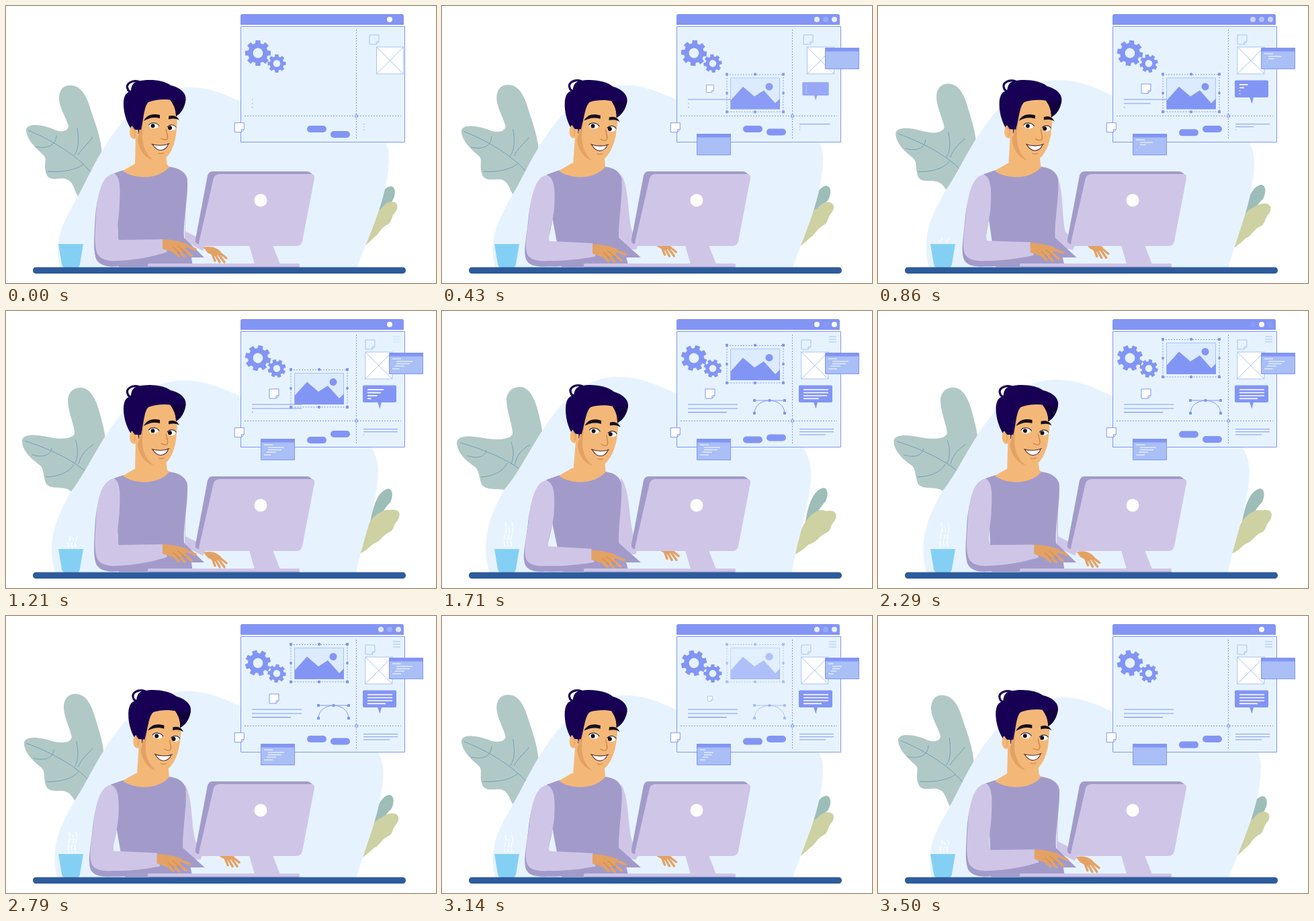
Animation, 640 px wide and 412 px high, one loop 3.57 s. Source, as an HTML page with a canvas:

```html
<!DOCTYPE html>
<html>
<head>
<meta charset="utf-8">
<title>Designer at work</title>
<style>
html, body { margin: 0; width: 100%; height: 100%; overflow: hidden; background: #fff; }
canvas { display: block; }
</style>
</head>
<body>
<canvas id="stage" width="640" height="412"></canvas>
<script>
const c = document.getElementById('stage').getContext('2d');
const LOOP = 3570, STEP = LOOP / 50;
const BLUE = '#8395f4', PALE = '#e6f3ff', CARD = '#a9bff6', LINE = '#a9c2f6';
const LILAC = '#cfc6e7', PURPLE = '#a29bca', SKIN = '#f3b878', TAN = '#e3a264', HAIR = '#170054', INK = '#150f1e';

const clamp = x => Math.max(0, Math.min(1, x));
const ramp = (t, a, b) => clamp((t - a) / (b - a));
const ease = (t, a, b) => (1 - Math.cos(Math.PI * ramp(t, a, b))) / 2;
const wave = (t, period) => (1 - Math.cos(2 * Math.PI * t / period)) / 2;
// A wave that rests for a while at both ends.
const sway = (t, period) => clamp(.5 + 1.3 * (wave(t, period) - .5));
const lerp = (a, b, k) => a + (b - a) * k;

// Blend two paths that share the same commands.
function mix(a, b, k) {
  const to = b.match(/[\d.]+/g);
  let i = 0;
  return a.replace(/[\d.]+/g, n => lerp(+n, +to[i++], k).toFixed(2));
}
function fill(color, d) {
  c.fillStyle = color;
  c.fill(new Path2D(d));
}
function line(color, d, width = 1, dash = []) {
  c.strokeStyle = color;
  c.lineWidth = width;
  c.setLineDash(dash);
  c.stroke(new Path2D(d));
  c.setLineDash([]);
}
function box(x, y, w, h, color, edge, r = 0) {
  c.beginPath();
  c.roundRect(x, y, w, h, r);
  if (color) { c.fillStyle = color; c.fill(); }
  if (edge) { c.strokeStyle = edge; c.lineWidth = 1; c.stroke(); }
}
function oval(x, y, rx, ry, color) {
  c.beginPath();
  c.ellipse(x, y, rx, ry, 0, 0, 7);
  c.fillStyle = color;
  c.fill();
}
const dot = (x, y, r, color) => oval(x, y, r, r, color);
function group(draw, { x = 0, y = 0, turn = 0, scale = 1, alpha = 1 }) {
  if (alpha <= 0 || scale <= 0) return;
  c.save();
  c.translate(x, y);
  c.rotate(turn);
  c.scale(scale, scale);
  c.globalAlpha *= alpha;
  draw();
  c.restore();
}

function plants(k) {
  fill('#b1c9c6', mix(
    'M107,283 C100,270 100,260 88,257 C80,255 65,262 60,250 C55,235 62,228 56,222 C48,214 30,200 30,184 C32,172 60,178 72,184 C82,188 92,187 93,179 C90,166 78,150 79,135 C80,122 88,117 97,118 C115,119 122,140 128,160 C135,180 142,200 143,222 L140,260Z',
    'M100,270 C95,266 90,265 82,265 C72,265 60,264 58,255 C55,245 55,236 48,231 C38,224 22,212 22,195 C24,184 45,186 62,189 C80,192 101,192 105,183 C106,172 96,150 96,130 C98,117 108,112 118,113 C132,115 140,135 144,153 C148,170 150,180 150,190 L140,260Z', k));
  line('#739fbb', mix(
    'M33,185 C70,200 110,225 130,252 M44,209 C60,213 75,208 75,192 M62,246 C85,248 105,243 115,236 M106,181 C109,200 108,215 101,222 M129,195 C122,205 112,213 107,222',
    'M27,196 C60,205 95,220 114,234 M37,215 C50,220 64,218 66,207 M58,247 C75,246 90,240 97,226 M103,195 C108,210 106,220 103,228 M131,199 C120,205 112,212 108,229', k));
  fill('#9dbdb9', mix(
    'M545,318 C552,290 560,269 573,268 C581,270 580,282 575,290 C567,296 562,306 548,322Z',
    'M540,320 C544,290 552,266 568,263 C575,264 575,275 571,283 C562,292 558,303 545,322Z', k));
  fill('#ced1a1', mix(
    'M530,360 C535,328 545,306 558,302 C564,294 568,292 572,291 C586,290 584,303 578,308 C572,316 575,322 566,326 C556,332 555,340 548,344 C543,349 538,354 530,360Z',
    'M525,362 C530,330 540,305 560,297 C568,294 570,299 575,297 C590,296 588,308 583,314 C577,320 580,327 570,331 C560,336 557,345 546,347 C540,352 536,357 525,362Z', k));
  fill(PALE, mix(
    'M82,395 C68,345 88,318 107,283 C132,240 174,121 275,121 C325,121 350,152 400,155 C480,155 570,170 570,222 C570,285 540,340 520,395 Q300,402 82,395Z',
    'M72,395 C56,345 70,305 93,265 C134,222 168,98 262,98 C315,98 345,128 400,140 C480,145 549,185 549,240 C549,290 526,345 520,395 Q300,402 72,395Z', k));
}

function gear(x, y, r, turn) {
  group(() => {
    dot(0, 0, r * .78, BLUE);
    for (let i = 0; i < 8; i++) {
      fill(BLUE, `M${-r * .25},0 L${-r * .19},${-r} H${r * .19} L${r * .25},0Z`);
      c.rotate(Math.PI / 4);
    }
    dot(0, 0, r * .39, PALE);
  }, { x, y, turn });
}

function note(edge, face) {
  fill(face, 'M-7,-7 H7 V3 L3,7 H-7Z');
  line(edge, 'M-7,-7 H7 V3 L3,7 H-7Z M3,7 V3 H7');
}

// Each row is x, y and full width; rows appear one after another.
function rows(list, color, width, grow) {
  list.forEach(([x, y, w], i) => line(color, `M${x},${y} h${Math.max(1.2, w * grow(i))}`, width));
}

function card(x, y, t) {
  group(() => {
    box(.5, .5, 50, 31, CARD, BLUE);
    box(0, 0, 51, 5.5, BLUE);
    const out = 1 - ramp(t, 2950, 3400);
    if (t > 480 && out > 0)
      rows([[5, 9, 13], [11, 13, 24], [11, 16.5, 20], [9, 20, 14], [5, 24, 13]], '#f2f7ff', 1.2,
        i => ramp(t, 480 + i * 120, 800 + i * 120) * out);
  }, { x, y, alpha: ramp(t, 60, 350) });
}

function picture() {
  line(BLUE, 'M424,0.5 H508 V56 H424Z', 1, [2, 2]);
  box(429.5, 5.5, 73, 46, '#dcebfe', LINE);
  fill(BLUE, 'M429.5,52 V39 L448,18.5 L465,33 L479,24 L496,43 L503,36 V52Z');
  dot(487, 18.5, 5.5, BLUE);
  for (const x of [424, 508]) {
    for (const y of [0, 56]) box(x - 2, y - 2, 4, 4, BLUE);
    dot(x, 28, 2, BLUE);
  }
  for (const y of [0, 56]) dot(466, y, 2.2, BLUE);
}

function curve() {
  line(BLUE, 'M465,133 H510 M465,152 C466,127 509,127 510,152');
  for (const [x, y] of [[465, 133], [510, 133], [465, 152], [510, 152]]) box(x - 2, y - 2, 4, 4, BLUE);
  dot(487.5, 133, 2.2, BLUE);
}

function bubble(t) {
  box(-25, -13, 50, 25.5, BLUE, null, 2);
  fill(BLUE, 'M-3,12 H3 L0.5,22Z');
  rows([[-18, -6.5, 37], [-18, -2, 37], [-18, 2.5, 37], [-18, 6.8, 27]], '#fff', 1.7,
    i => ramp(t, 480 + i * 190, 1600 + i * 80));
}

function panel(t, k) {
  fill(BLUE, 'M349,28 V15 Q349,12 352,12 H589 Q592,12 592,15 V28Z');
  box(349.5, 30.5, 244, 172, PALE, BLUE);
  [[558, k], [571, 1 - k], [584, k]].forEach(([x, a]) =>
    group(() => dot(0, 0, 4, '#fff'), { x, y: 20, alpha: a }));

  line(BLUE, 'M521.5,35 V198 M355,163.5 H588', 1, [2, 2]);
  dot(521.5, 163.5, 2.5, BLUE);
  dot(521.5, 163.5, 1.2, PALE);

  const turn = t * .00018;
  gear(375, 70, 19, turn);
  gear(403, 85.5, 13.5, -turn * 1.4);

  box(448, 178 + 9 * sway(t - 200, 2400), 29, 10, BLUE, null, 5);
  box(483, 186 - 8 * sway(t + 110, 2290), 29, 10, BLUE, null, 5);

  const slide = ease(t, 0, 880);
  group(() => note(LINE, PALE), { x: 548 - 6 * slide, y: 50 });
  group(() => {
    box(.5, .5, 40, 40, '#fff', LINE);
    line(LINE, 'M0,0 L41,41 M41,0 L0,41');
  }, { x: 551 - 16.7 * slide, y: 60.5 });
  group(() => note(BLUE, '#fff'), { x: 347.3, y: 180.7 });

  group(() => line(LINE, 'M576,38 h11 M576,42 h11 M576,46 h11'), { alpha: ramp(t, 950, 1600) });

  const grow = i => ramp(t, i * 600, 480 + i * 600);
  rows([[366, 139, 74], [366, 145, 74], [366, 150.7, 58]], BLUE, 1.2, grow);
  rows([[532, 175.7, 51], [532, 179.7, 51], [532, 184, 39]], BLUE, 1, grow);

  const pop = ease(t, 130, 560), out = 1 - ramp(t, 2950, 3350);
  group(() => note(BLUE, '#fff'), { x: 399, y: 123, scale: pop * out });
  group(() => bubble(t), { x: 556, y: 123.5, scale: pop, alpha: pop });
  group(curve, { alpha: ramp(t, 1250, 1600) * out });
  group(picture, { y: 101.5 - 59.5 * ease(t, 822, 2015), alpha: ramp(t, 100, 460) * out });
  card(379, 190, t);
  card(570, 62, t);
}

function head() {
  // neck, back of the hair, ear, face
  fill(SKIN, 'M193,190 L192,238 C205,252 232,250 240,238 L238,222Z');
  fill(HAIR, 'M192,190 C183,182 174,162 175,142 C176,132 180,128 186,127 L225,130 L212,190Z');
  oval(190.5, 187.5, 6.5, 10.5, SKIN);
  line(TAN, 'M188,182 C192,183 193,189 191,194', 1.3);
  fill(SKIN, 'M203,146 C210,132 245,132 253,148 C255,160 255,172 254,182 C253,200 248,215 240,224 C235,229 225,231 218,229 C205,225 198,212 196,200 L199,180Z');
  fill(TAN, 'M203,148 L210,143 C204,165 203,180 203,198 C205,214 211,223 220,229.5 C205,226 198,212 196,200 L199,180Z');
  fill(HAIR, 'M192,184 C178,168 175,140 186,127 C186,118 190,113 197,112 C212,108 235,110 245,118 C262,122 270,132 267,142 C265,152 260,160 253,164 C253,155 250,147 246,140 C236,138 222,139 212,143 C205,149 205,168 201,184Z');
  fill('#12003d', 'M244,139.5 C253,141 262,139 267.5,139 C266,152 260,160 253,164 C253,155 250,147 244,139.5Z');
  line(HAIR, 'M198,112.5 C187,109.5 178,116 181,123 C182,127 185,128 188,127', 3.2);
  // brows and eyes
  fill(INK, 'M205,171 C209,162 218,159 229,162 L229,167 C219,164.5 212,167 205,171Z');
  fill(INK, 'M242,164 C249,161.5 255,164 258,170 C253,167 248,167 242,168.5Z');
  oval(220, 178, 7, 4.3, '#fff');
  oval(246.5, 181, 6, 4.2, '#fff');
  line(INK, 'M212.5,177 C215,172.5 224,172.5 228,178 M240,180 C243,176 250,175.5 253,180', 1);
  dot(218.5, 178.3, 3, INK);
  dot(244, 181.3, 3, INK);
  // nose and mouth
  line('#cd8848', 'M238,183 C239,190 243,195 239,198.5 C236,200 233,198 231,197', 1.4);
  fill('#fff', 'M218,206 C225,208 236,208 242,205 C240,214 232,217 226,214 C222,212 220,209 218,206Z');
  line('#592a28', 'M217,205.5 C225,208 236,208 243,204.5 M218,206 C222,212 226,215 231,214.5 C237,214 240,210 241.5,205.5', 1.1);
  line('#cd8848', 'M227,219 Q231,220.5 235,218.5', 1.1);
}

function rightHand() {
  fill(TAN, 'M294,359 C305,356 315,360 320,366 L312,373 L300,367Z');
  line(TAN, 'M313,363 L328,375 M314,366 L325,381 M310,367 L318,381 M306,366 L311,379', 3.4);
}
function leftHand() {
  fill(TAN, 'M233,347 C248,347 262,351 270,354 L266,364 L250,367 L233,361Z');
  line(TAN, 'M264,355 L282,362 M260,358 L276,371 M254,361 L266,373 M247,362 L257,372', 3.8);
  line('#bd7c42', 'M256,357 L268,367 M249,359 L259,368', .8);
}

function man(k) {
  fill(LILAC, mix(
    'M266,262 C269,280 267,310 267,335 L283,343 L298,355 L293,364 L266,350Z',
    'M266,247 C282,268 277,310 287,336 L290,345 L291,355 L288,362 L262,362Z', k));
  group(rightHand, { x: 25 * k, y: -11 * k });
  fill(PURPLE, mix(
    'M160,249 L175,244 C190,255 225,256 243,239 C258,241 268,247 270,258 C271,290 264,310 265,345 L295,374 L276,374 L278,388 H168 L166,320Z',
    'M155,251 L175,244 C190,255 225,256 243,239 C258,241 265,247 267,258 C268,290 263,310 263,345 L296,374 L274,374 L278,388 H180 L165,320Z', k));
  fill(SKIN, 'M193,234 L174,245 C190,258 228,259 243,239 L236,232Z');
  group(() => {
    c.translate(-215, -240);
    head();
  }, { x: 215 + 3.5 * k, y: 240, turn: k * .063 });

  const sleeve = mix(
    'M161,249 C171,255 170,275 169,295 C168,320 163,335 168,348 L234,347 L240,366 C215,374 190,378 165,379 C150,380 138,376 135,366 C131,352 133,335 134,310 C136,280 142,252 161,249Z',
    'M155,252 C167,255 168,275 167,295 C166,320 156,338 158,350 L222,354 L226,374 C200,378 175,380 155,379 C140,380 128,377 125,369 C120,356 126,335 129,310 C132,280 140,253 155,252Z', k);
  group(() => fill(PURPLE, sleeve), { x: -1.5, y: 8.5 });
  fill(LILAC, sleeve);
  group(leftHand, { x: -11 * k, y: 9 * k });
}

function monitor() {
  fill(LILAC, 'M362,356 H397 L408,384 H370Z');
  box(211, 383, 226, 6, LILAC, null, 2);
  line(PURPLE, 'M212,388 H436', 1);
  fill(PURPLE, 'M307,246 H448 Q453,246 459,254 L320,256 L294,354 H287 Q281,354 282,347 L300,252 Q302,246 307,246Z');
  fill(LILAC, 'M318,250 H454 Q460,250 459,256 L441,350 Q439,357 433,357 H292 Q286,357 287.5,350 L309,256 Q311,250 318,250Z');
  dot(379, 289, 9.5, '#fff');
}

function cup(t) {
  const rise = ramp(t, 700, 1700) * (1 - .5 * ramp(t, 2400, 3500));
  c.lineDashOffset = t / 60;
  for (let i = 0; i < 3; i++) {
    const x = 94 + i * 5, h = 36 * rise - (i % 2) * 5;
    if (h > 4) line('#fff', `M${x},351 q-3,${-h / 4} 0,${-h / 2} t0,${-h / 2}`, 1.3, [7, 3]);
  }
  c.lineDashOffset = 0;
  fill('#84d0f4', 'M78,354 H115 L110,384 Q109,389 105,389 H88 Q84,389 83,384Z');
}

function draw(now) {
  // Steps last 70 or 80 ms, so allow for an early change.
  const t = Math.floor(now % LOOP / STEP + .15) * STEP;
  const lean = wave(t, LOOP / 3);
  c.clearRect(0, 0, 640, 412);
  c.lineCap = 'butt';
  plants(wave(t, LOOP));
  panel(t, lean);
  c.lineCap = 'round';
  man(lean);
  monitor();
  cup(t);
  box(40, 388.5, 555, 9.5, '#2e5b9c', null, 4.5);
}

const start = performance.now();
function tick() {
  draw(performance.now() - start);
  requestAnimationFrame(tick);
}
tick();
</script>
</body>
</html>
```
